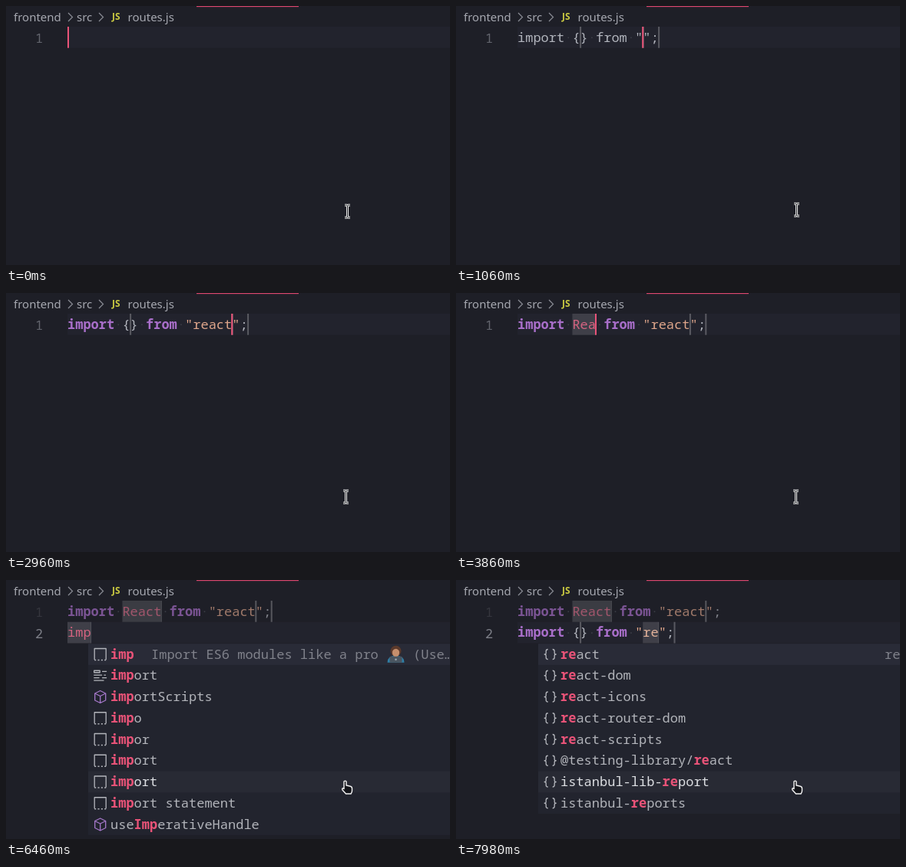
These frames come from a looping animation (578x338 px, 8 s). An HTML page:

```html
<!DOCTYPE html>
<html lang="en">
<head>
<meta charset="utf-8">
<title>Editor typing</title>
<style>
  html, body { margin: 0; width: 100%; height: 100%; overflow: hidden; background: #1e1f27; }
  svg { display: block; width: 578px; height: 338px; }
  text { white-space: pre; font: 17px "Noto Sans Mono", "DejaVu Sans Mono", monospace; }
  .crumb { font: 15px "Noto Sans", "Open Sans", sans-serif; fill: #a6a8b0; }
  .js { font: bold 12px "Noto Sans", "Open Sans", sans-serif; fill: #cbcb41; }
  .key { fill: #a96fca; font-weight: bold; }
  .str { fill: #dfa68b; }
  .name { fill: #cf4c6e; }
  .punct { fill: #b2b5bd; }
  .match { fill: #e95378; font-weight: bold; }
  .icon { fill: none; stroke-width: 1.3; stroke-linejoin: round; }
</style>
</head>
<body>
<svg viewBox="0 0 578 338">
  <rect width="578" height="338" fill="#1e1f27"/>
  <rect x="248" width="133" height="1.2" fill="#d5456c"/>
  <text class="crumb" x="10" y="20">frontend</text>
  <text class="crumb" x="92" y="20">src</text>
  <text class="crumb" x="158.5" y="20">routes.js</text>
  <text class="js" x="138" y="18">JS</text>
  <path d="M81 9l5.5 5.5l-5.5 5.5M121 9l5.5 5.5l-5.5 5.5" fill="none" stroke="#8b8d96" stroke-width="1.2"/>
  <g id="editor"></g>
  <g id="popup"></g>
  <g id="mouse"></g>
</svg>
<script>
const LOOP = 8000, CHAR = 10.2, LEFT = 80, TOP = 27, LINE = 27.75;
const layer = id => document.getElementById(id);

const ICONS = {
  wrench: ['#b4b6bc', 'M-7.5 5.2L0-1.6C-1.2-5 1.4-8.2 5-7.4L2.2-4.4L2.6-2.6L4.4-2.2L7.4-5C8.2-1.4 5-1.2 1.6 0L-5.2 7.5Q-8.6 8.4-7.5 5.2Z'],
  key: ['#b4b6bc', 'M-8-6.5H-.5V-4H-8ZM2.4-5.3H8.4M-8.4-.6H2.4M4.8-.6H7.2M-8.4 2.9H-1.2M2.4 2.9H8.4M-8.4 6.3H4.8'],
  cube: ['#a678cb', 'M0-8L7-4.5V4.5L0 8L-7 4.5V-4.5ZM-7-4.5L0-1L7-4.5M0-1V8'],
  value: ['#6aaee9', 'M-5-6.5H-8V6.5H-5M5-6.5H8V6.5H5M-4.5-.5L1-3.5L4.5-1.5V1L-1 4L-4.5 2ZM-4.5-.5L-1 1.5L4.5-1.5M-1 1.5V4'],
  snip: ['#b4b6bc', 'M-7.5 7V-7.5H7.5V7M-7.5 7.5h2M-3.2 7.5h2M1.2 7.5h2M5.5 7.5h2'],
  module: ['#b4b6bc', 'M-3-6.5Q-5.5-6.5-5.5-4V-2Q-5.5 0-7.5 0Q-5.5 0-5.5 2V4Q-5.5 6.5-3 6.5M3-6.5Q5.5-6.5 5.5-4V-2Q5.5 0 7.5 0Q5.5 0 5.5 2V4Q5.5 6.5 3 6.5']
};

const rows = text => text.split(',').map(item => item.split(':'));
const startRows = rows('wrench:i,key:if,key:import,cube:importScripts,key:in,value:indexedDB,value:innerHeight,' +
  'value:innerWidth,key:instanceof,cube:isFinite,cube:isNaN');
const impRows = rows('snip:imp,key:import,cube:importScripts,snip:impo,snip:impor,snip:import,snip:import,' +
  'snip:import statement,cube:useImperativeHandle');
const reRows = rows('module:react,module:react-dom,module:react-icons,module:react-router-dom,module:react-scripts,' +
  'module:@testing-library/react,module:istanbul-lib-report,module:istanbul-reports');

const popup = (list, match, left, line, detail) => ({ list, match, left, line, detail });
const rePopup = line => popup(reRows, 're', 107, line, 'module');
const reactPopup = match => popup(reRows.slice(0, 6), match, 107, 0, 'module');
const fromLine = (what, path) => `import ${what} from "${path}";`;

// Boxes are [line, first column, last column]; equal columns give a thin marker.
const typedPath = (line, path) => [[line, 8, 8], [line, 16, 16 + path.length], [line, 18 + path.length, 18 + path.length]];
const path = (line, text, more = {}) => ({
  ['line' + line]: fromLine('{}', text), caret: [line, 16 + text.length], on: true, boxes: typedPath(line, text), ...more
});
const name = text => ({
  line0: fromLine(text, 'react'), caret: [0, 7 + text.length], on: true,
  boxes: [[0, 7, 7 + text.length], [0, 19 + text.length, 19 + text.length], [0, 21 + text.length, 21 + text.length]]
});
const doneBoxes = [[0, 7, 12], [0, 24, 24], [0, 26, 26]];
const word = text => ({ line1: text, caret: [1, text.length], on: true, boxes: [...doneBoxes, [1, 0, text.length]] });
const kept = doneBoxes.slice(0, 2);
const secondPath = (text, more = {}) => path(1, text, { ...more, boxes: [...kept, ...typedPath(1, text)] });

const STEPS = [
  [0, { line0: '', line1: null, caret: [0, 0], on: true, boxes: [], popup: null, raw: false, mouse: [444.5, 268] }],
  [100, { on: false, mouse: [444.5, 267] }],
  [220, { mouse: [444.5, 266] }],
  [400, { mouse: [443.5, 266] }],
  [540, { line0: 'i', caret: [0, 1], on: true }],
  [610, { popup: popup(startRows, 'i', 99, 0, 'emmet') }],
  [660, { line0: 'im', caret: [0, 2] }],
  [780, { line0: 'imp', caret: [0, 3], popup: popup(impRows, 'imp', 99, 0, 'modules') }],
  [960, path(0, '', { popup: null, raw: true })],
  [1120, { raw: false }],
  [1320, { on: false }],
  [1640, path(0, 'r')],
  [1840, path(0, 're')],
  [2220, { mouse: [442.5, 266] }],
  [2260, { on: false }],
  [2400, { popup: rePopup(0) }],
  [2500, path(0, 'rea', { popup: reactPopup('rea') })],
  [2620, path(0, 'reac', { popup: reactPopup('reac') })],
  [2720, path(0, 'react', { popup: reactPopup('react') })],
  [2900, { popup: null, boxes: [[0, 8, 8], [0, 21, 21], [0, 23, 23]] }],
  [3320, { caret: [0, 8] }],
  [3520, name('')],
  [3640, name('R')],
  [3760, name('Re')],
  [3860, name('Rea')],
  [3980, name('Reac')],
  [4100, name('React')],
  [4380, { caret: [0, 26], boxes: doneBoxes }],
  [4540, word('')],
  [4800, { on: false }],
  [5040, { on: true }],
  [5320, word('i')],
  [5400, word('im')],
  [5590, word('imp')],
  [5840, { popup: popup(impRows, 'imp', 107, 1, '') }],
  [6000, { popup: popup(impRows, 'imp', 107, 1, 'modules') }],
  [6100, { on: false }],
  [6520, secondPath('', { popup: null, raw: true })],
  [6590, { raw: false }],
  [6820, { on: false }],
  [7130, { on: true }],
  [7420, secondPath('r')],
  [7620, secondPath('re')],
  [7900, { popup: rePopup(1) }],
  [7960, { on: false }]
];

let running = {};
const STATES = STEPS.map(([, change]) => running = { ...running, ...change });

const rect = (x, y, w, h, fill) => `<rect x="${x}" y="${y}" width="${w}" height="${h}" fill="${fill}"/>`;
const label = (x, y, content, fill) => `<text x="${x}" y="${y}" fill="${fill}">${content}</text>`;
const col = n => LEFT + n * CHAR;
const lineTop = n => TOP + n * LINE;

function colored(text, raw) {
  if (raw) return `<tspan class="punct">${text}</tspan>`;
  return text.replace(/(\bimport\b|\bfrom\b)|("[^"]*")|(\w+)|([^\w"]+)/g, (all, key, str, id) =>
    `<tspan class="${key ? 'key' : str ? 'str' : id ? 'name' : 'punct'}">${all}</tspan>`);
}

function codeLine(text, index, current, raw) {
  const y = lineTop(index);
  let out = current ? rect(LEFT, y, 578 - LEFT, LINE, '#22232d') : '';
  out += label(38, y + 21.2, index + 1, current ? (index ? '#7d7f88' : '#62646d') : '#35363e');
  out += `<g opacity="${current ? 1 : .67}">${label(LEFT, y + 19.5, colored(text, raw), '#aeb0b8')}</g>`;
  [...text].forEach((c, i) => {
    if (c === ' ') out += rect(col(i) + 4.3, y + 13.5, 1.6, 1.6, '#3d3f49');
  });
  return out;
}

function drawEditor(s) {
  const marks = s.boxes.map(([line, a, b]) => {
    const y = lineTop(line);
    return a === b ? rect(col(a) - .5, y, 2, LINE, '#ffffff40') : rect(col(a), y, (b - a) * CHAR, LINE, '#ffffff21') +
      rect(col(b) - .5, y, 1, LINE, '#ffffff26');
  }).join('');
  const [line, column] = s.caret;
  let out = codeLine(s.line0, 0, line === 0, s.raw && line === 0);
  if (s.line1 !== null) out += codeLine(s.line1, 1, true, s.raw);
  out += marks;
  if (s.on) out += rect(Math.max(LEFT, col(column) - 1), lineTop(line), 2, LINE, '#e95378');
  return out;
}

function icon(kind, x, y) {
  const [color, d] = ICONS[kind];
  return `<path class="icon" transform="translate(${x} ${y})" stroke="${color}" d="${d}"/>`;
}

const coder = (x, y) => `<g transform="translate(${x} ${y})">
  <path d="M-11 11Q-11 2 0 2Q11 2 11 11Z" fill="#2f7fa6"/><circle cy="-4" r="7" fill="#5b3a2c"/>
  <ellipse cy="-2" rx="4.6" ry="5.6" fill="#c58f6d"/><path d="M-5-4Q0-10 5-4L4-7L0-9L-4-7Z" fill="#5b3a2c"/>
  <rect x="-8" y="3" width="16" height="8" rx="1" fill="#4a5560"/><circle cy="7" r="1.3" fill="#9aa7b0"/></g>`;

function detail(kind, x, y) {
  const gray = '#80828b';
  if (kind === 'emmet') return label(390, y, 'Emmet Abbreviation', gray);
  if (kind === 'module') return label(558, y, 'react', gray);
  if (kind === 'modules') return label(x + 53, y, 'Import ES6 modules like a pro', gray) +
    coder(x + 371.5, y - 6) + label(x + 394, y, '(Use…', gray);
  return '';
}

const popupTop = p => lineTop(p.line + 1) + .6;
const hovered = s => {
  if (!s.popup) return -1;
  const row = Math.floor((s.mouse[1] - popupTop(s.popup)) / LINE);
  return row < s.popup.list.length ? row : -1;
};

function drawPopup(s) {
  const p = s.popup;
  if (!p) return '';
  const top = popupTop(p), hover = hovered(s), width = 578 - p.left;
  const textX = p.left + (p.left < 100 ? 30.3 : 29), iconX = p.left + (p.left < 100 ? 17 : 15.7);
  let out = rect(p.left, top, width, p.list.length * LINE, '#22242e');
  p.list.forEach(([kind, text], i) => {
    const y = top + i * LINE, mid = y + LINE / 2;
    if (i === 0 || i === hover) out += rect(p.left, y, width, LINE, i ? '#282a34' : '#292b37');
    const marked = text.replace(new RegExp(p.match, 'i'), m => `<tspan class="match">${m}</tspan>`);
    out += icon(kind, iconX, mid) + label(textX, mid + 5.7, marked, i === hover ? '#dcdee2' : '#b2b4ba');
  });
  return out + detail(p.detail, textX, top + LINE / 2 + 5.7);
}

function drawMouse(s) {
  const [x, y] = s.mouse;
  const hand = 'M-2.5-3Q-1-4.8.5-3V2L5 3Q8 3.5 8 6V9Q8 11 6.5 13H0L-4.5 8Q-5.5 6-3.8 5.6L-2.5 6.5Z';
  const beam = 'M-3.5-8H-1L0-7.3L1-8H3.5M0-7.3V7.3M-3.5 8H-1L0 7.3L1 8H3.5';
  const body = hovered(s) >= 0
    ? `<path d="${hand}" fill="#14151a" stroke="#f4f4f4" stroke-width="1.4" stroke-linejoin="round"/>`
    : `<path d="${beam}" fill="none" stroke="#f4f4f4" stroke-width="3"/><path d="${beam}" fill="none" stroke="#17181d" stroke-width="1"/>`;
  return `<g transform="translate(${x} ${y})">${body}</g>`;
}

let shown = -1;
function render(time) {
  const t = time % LOOP;
  const index = STEPS.findLastIndex(([start]) => start <= t);
  if (index !== shown) {
    shown = index;
    const s = STATES[index];
    layer('editor').innerHTML = drawEditor(s);
    layer('popup').innerHTML = drawPopup(s);
    layer('mouse').innerHTML = drawMouse(s);
  }
}

const began = performance.now();
function tick() {
  render(performance.now() - began);
  requestAnimationFrame(tick);
}
tick();
</script>
</body>
</html>
```
